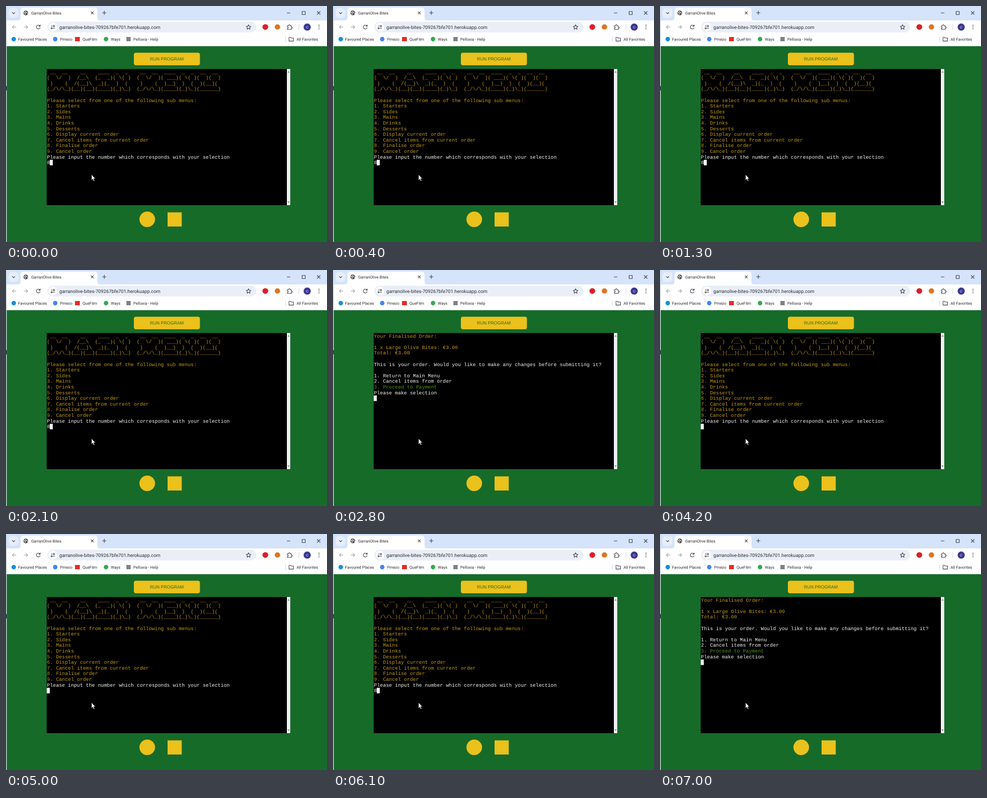
An HTML page for the animation above (8 s loop, 600x442 px).

```html
<!DOCTYPE html>
<html lang="en">
<head>
<meta charset="utf-8">
<title>Order terminal</title>
<style>
html, body { margin: 0; width: 100%; height: 100%; overflow: hidden; background: #166b29; }
svg { display: block; width: 600px; height: 442px; }
text { text-rendering: geometricPrecision; white-space: pre; }
.ui { font: 7.4px Roboto, "Open Sans", sans-serif; fill: #2b2d31; }
.url { font-size: 8.85px; }
.run { font: 8.3px "Liberation Sans", Arial, sans-serif; fill: #2a6b22; }
.term { font: 9.345px "Liberation Mono", "Courier New", monospace; }
.line { fill: none; stroke: #45484d; stroke-width: 1.1; }
.pale { stroke: #a9acb1; }
</style>
</head>
<body>
<svg viewBox="0 0 600 442">
  <!-- tab strip -->
  <rect width="600" height="40" fill="#d5e3fb"/>
  <rect x="5" y="4" width="18" height="18" rx="6" fill="#e6eefc"/>
  <path class="line" d="M11.5 11.8l2.7 2.7 2.7-2.7"/>
  <path d="M22 27q5 0 5-5V9q0-6 6-6h132q6 0 6 6v13q0 5 5 5z" fill="#fff"/>
  <circle cx="37" cy="13" r="4.4" fill="#45484d"/>
  <path d="M33.6 11.5l2.4 2.3v2.6M37 9.5l-.6 2 2.4.8 1.6 2" fill="none" stroke="#fff" stroke-width="1.1"/>
  <text class="ui" x="47" y="15.7">GarranOlive Bites</text>
  <path class="line" d="M158.7 10.3l5 5m0-5l-5 5M180 12.8h7.4m-3.7-3.7v7.4"/>
  <path class="line" d="M525 13h6.5M553.5 10.2h5.8v5.8h-5.8zM581.5 10l6 6m0-6l-6 6"/>

  <!-- toolbar -->
  <rect y="27" width="600" height="48.5" fill="#fff"/>
  <path class="line pale" d="M19 39.4h-7.2m3.4-3.4l-3.4 3.4 3.4 3.4M33.5 39.4h7.2m-3.4-3.4l3.4 3.4-3.4 3.4"/>
  <path class="line" d="M63.3 37.2a3.6 3.6 0 1 0 .6 3.2M63.9 35v2.9h-2.9"/>
  <rect x="77" y="29.5" width="391" height="20" rx="10" fill="#e9eef7"/>
  <circle cx="87.5" cy="39.4" r="8" fill="#fff"/>
  <path class="line" d="M84 37.5h3.2M88 41.5h3.2"/>
  <circle class="line" cx="89.6" cy="37.5" r="1.3"/>
  <circle class="line" cx="85.4" cy="41.5" r="1.3"/>
  <text class="ui url" x="99.7" y="42.5">garranolive-bites-709267bfe701.herokuapp.com</text>
  <path class="line" stroke-linejoin="round" d="M453.4 35l1.3 2.9 3.1.3-2.3 2.1.7 3.1-2.8-1.6-2.8 1.6.7-3.1-2.3-2.1 3.1-.3z"/>
  <circle cx="484.7" cy="39.3" r="5.4" fill="#d9202b"/>
  <circle cx="507.3" cy="39.3" r="5" fill="#df7425"/>
  <path class="line" d="M526 37h2.3q-.4-2 1.3-2t1.3 2h2.3v2.4q2 0 2 1.3t-2 1.3v1.7H526v-2q1.6-.2 1.6-1.2T526 39.3z"/>
  <path d="M547.5 34v11" stroke="#c9daf6"/>
  <circle cx="563" cy="39.4" r="6.7" fill="#393795"/>
  <text class="ui" x="563" y="41.6" text-anchor="middle" style="fill:#fff;font-size:6px">C</text>
  <g fill="#45484d"><circle cx="585" cy="36" r=".9"/><circle cx="585" cy="39.4" r=".9"/><circle cx="585" cy="42.8" r=".9"/></g>

  <!-- bookmarks -->
  <circle cx="14.5" cy="62" r="4.2" fill="#168fd8"/>
  <circle cx="92" cy="62" r="4.2" fill="#4285f4"/>
  <rect x="129" y="58" width="9" height="8" fill="#e52d27"/>
  <circle cx="187" cy="62" r="4.2" fill="#34a853"/>
  <rect x="225" y="58" width="8" height="8" fill="#7d8189"/>
  <g class="ui">
    <text x="22.5" y="64.9">Favoured Places</text>
    <text x="101" y="64.9">Pmezo</text>
    <text x="143" y="64.9">QueFilm</text>
    <text x="196" y="64.9">Ways</text>
    <text x="238" y="64.9">Pelloxia - Help</text>
    <text x="543" y="64.9">All Favorites</text>
  </g>
  <path d="M522.5 57v10" stroke="#c9daf6"/>
  <path class="line" d="M529 58.8h3l1 1.2h4.3v5.6H529z"/>

  <!-- page -->
  <rect y="75.5" width="600" height="367" fill="#166b29"/>
  <rect width="1.4" height="442" fill="#c8d6dd"/>
  <rect y="150" width="1.4" height="8" fill="#20204a"/>
  <rect x="239" y="87.5" width="123.5" height="23.5" rx="4" fill="#ebc11c"/>
  <text class="run" x="300.5" y="102.4" text-anchor="middle">RUN PROGRAM</text>
  <rect x="76" y="118" width="449" height="255"/>
  <rect x="525" y="118" width="6.3" height="255" fill="#f1f1f1"/>
  <path d="M526.3 124.5l1.9-2.2 1.9 2.2zM526.3 366.3l1.9 2.2 1.9-2.2z" fill="#666"/>
  <circle cx="264" cy="399.5" r="14.6" fill="#ebc11c"/>
  <rect x="302" y="386.5" width="26.5" height="26.5" fill="#ebc11c"/>

  <g id="menu" class="term"></g>
  <g id="order" class="term"></g>
  <text id="typed" class="term" x="76.6" fill="#f4f4f4"></text>
  <rect id="caret" width="5.6" height="10.4" fill="#fff"/>
  <path d="M160 316v10.2l2.3-2.1 1.7 3.8 1.5-.7-1.7-3.7h3z" fill="#fff" stroke="#222" stroke-width=".5"/>
</svg>
<script>
const LEFT = 76.6, CELL = 5.607, ROW = 10.6, BASE = 126.6, LOOP = 8000;
const COLORS = { y: '#c39a12', w: '#f4f4f4', g: '#4b9612' };
const byId = id => document.getElementById(id);

// The first letter of each line picks its colour.
const screens = {
  menu: String.raw`y __  __    __    ____  _  _    __  __  ____  _  _  __  __
y(  \/  )  /__\  (_  _)( \( )  (  \/  )( ___)( \( )(  )(  )
y )    (  /(__)\  _)(_  )  (    )    (  )__)  )  (  )(__)(
y(_/\/\_)(__)(__)(____)(_)\_)  (_/\/\_)(____)(_)\_)(______)

yPlease select from one of the following sub menus:
y1. Starters
y2. Sides
y3. Mains
y4. Drinks
y5. Desserts
y6. Display current order
y7. Cancel items from current order
y8. Finalise order
y9. Cancel order
wPlease input the number which corresponds with your selection`,
  order: `yYour Finalised Order:

y1 x Large Olive Bites: €3.00
yTotal: €3.00

wThis is your order. Would you like to make any changes before submitting it?

w1. Return to Main Menu
w2. Cancel items from order
g3. Proceed to Payment
wPlease make selection`
};

const steps = [
  [0, 'menu', '8'],
  [2800, 'order', ''],
  [3700, 'order', '1'],
  [4200, 'menu', ''],
  [5600, 'menu', '8'],
  [6200, 'order', '']
];

const promptRow = {};
for (const [id, content] of Object.entries(screens)) {
  const lines = content.split('\n');
  promptRow[id] = lines.length;
  byId(id).innerHTML = lines.map((line, row) =>
    line && `<text xml:space="preserve" x="${LEFT}" y="${BASE + row * ROW}" fill="${COLORS[line[0]]}">${line.slice(1)}</text>`
  ).join('');
}

const start = performance.now();
function draw() {
  const time = (performance.now() - start) % LOOP;
  const [, screen, input] = steps.filter(step => step[0] <= time).pop();
  for (const id in screens) byId(id).style.display = id === screen ? '' : 'none';
  const y = BASE + promptRow[screen] * ROW;
  byId('typed').textContent = input;
  byId('typed').setAttribute('y', y);
  byId('caret').setAttribute('x', LEFT - .4 + input.length * CELL);
  byId('caret').setAttribute('y', y - 8.2);
  requestAnimationFrame(draw);
}
draw();
</script>
</body>
</html>
```
